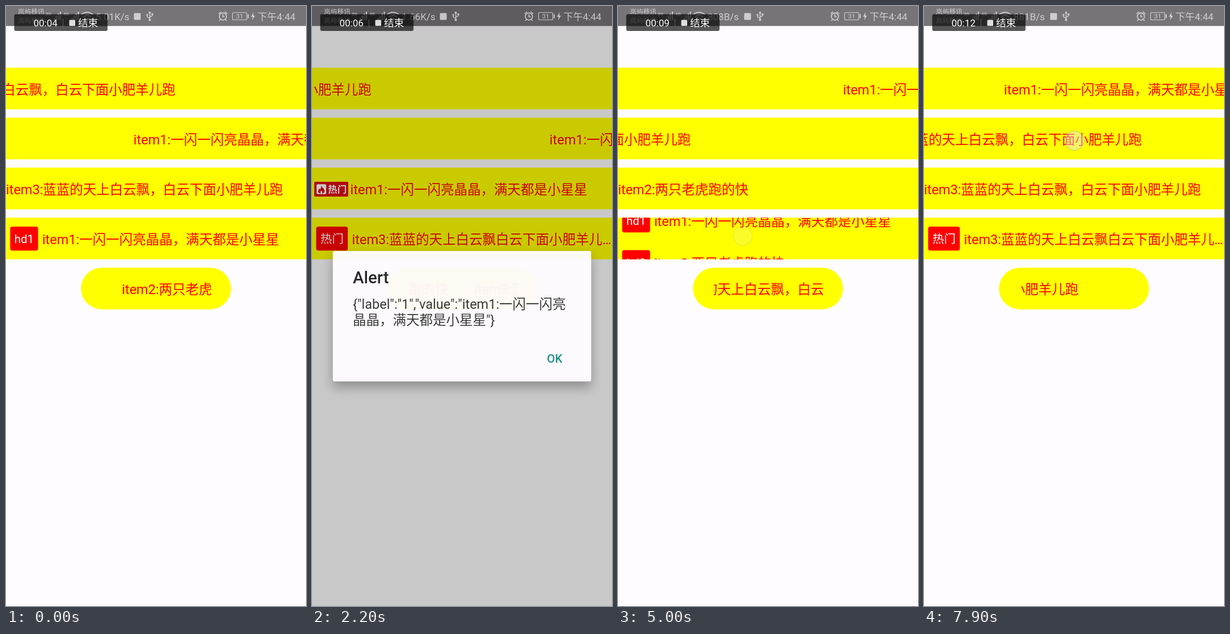
These frames come from a looping animation (529 px wide and 1058 px high, 8 s). An HTML page:

```html
<!DOCTYPE html>
<html lang="zh-CN">
<head>
<meta charset="utf-8">
<title>Marquee</title>
<style>
html, body { margin: 0; width: 100%; height: 100%; overflow: hidden; background: #fefcfe; }
svg { font-family: Roboto, "Noto Sans CJK SC", "Noto Sans CJK", sans-serif; }
#stage { display: block; width: 100%; height: 100%; }
text { white-space: pre; }
.row text { font-size: 16px; fill: #f00; }
.row .tag { font-size: 14px; fill: #fff; }
.row .hot { font-size: 11.2px; font-weight: 700; fill: #fff; }
#panel { filter: drop-shadow(0 7px 7px rgba(0, 0, 0, .3)); }
</style>
</head>
<body>
<svg id="stage" viewBox="0 0 360 720">
  <rect width="360" height="720" fill="#fefcfe"/>
  <rect width="360" height="24" fill="#777477"/>
  <g fill="#ff0">
    <rect y="74" width="360" height="50"/>
    <rect y="134" width="360" height="50"/>
    <rect y="194" width="360" height="50"/>
    <rect y="254" width="360" height="50"/>
    <rect x="90" y="314" width="180" height="50" rx="25"/>
  </g>
  <svg class="row" id="left" y="74" width="360" height="50"></svg>
  <svg class="row" id="right" y="134" width="360" height="50"></svg>
  <svg class="row" id="up" y="194" width="360" height="50"></svg>
  <svg class="row" id="down" y="254" width="360" height="50"></svg>
  <svg class="row" id="pill" x="115" y="314" width="131" height="50" viewBox="115 0 131 50"></svg>

  <rect id="dim" width="360" height="720"/>
  <g id="dialog">
    <rect id="panel" x="25" y="294" width="310" height="156.5" rx="2" fill="#fffdff"/>
    <text x="49" y="333" font-size="20" font-weight="500" fill="#222">Alert</text>
    <g font-size="16" fill="#333">
      <text x="49" y="363.6">{"label":"1","value":"item1:一闪一闪亮</text>
      <text x="49" y="382.8">晶晶，满天都是小星星"}</text>
    </g>
    <svg x="270" y="404.4" width="52" height="36">
      <circle id="ripple" cx="25.4" cy="18" fill="#000" fill-opacity=".12"/>
    </svg>
    <text x="282" y="428.2" font-size="14" font-weight="500" fill="#148f83">OK</text>
  </g>

  <!-- status bar, in device pixels -->
  <g transform="scale(.68053)">
    <g fill="#fff" opacity=".65" font-size="17">
      <g font-size="11.7">
        <text x="21" y="14">岚屿移讯</text>
        <text x="21" y="30">岚屿移讯</text>
      </g>
      <g font-size="8" font-weight="700">
        <text x="70" y="17">2G</text>
        <text x="101" y="17">4G</text>
      </g>
      <path id="bars" d="M84 21h2v4h-2zM87.700 17h2v8h-2zM91.400 13h2v12h-2zM95 10h2v15h-2z"/>
      <use href="#bars" x="31.500"/>
      <g fill="none" stroke="#fff" stroke-width="1.700">
        <path d="M132.500 15.500a15 15 0 0 1 21 0M136 19.500a10 10 0 0 1 14 0M140 23a5 5 0 0 1 6 0"/>
        <circle cx="382.500" cy="18.500" r="6.300"/>
        <path d="M382.500 14.500v4.500h3M375 14l4-4M390 14l-4-4M378 24l-2 2M387 24l2 2"/>
        <rect x="399.500" y="11.500" width="25" height="13" rx="2" stroke-width="1.200"/>
      </g>
      <text id="speed" x="158" y="24.500"></text>
      <g id="usb">
        <rect x="225.500" y="12.500" width="12" height="12" rx="1.500"/>
        <path d="M253.500 12v13M253.500 22l-4.500-3v-3M253.500 20l4.500-3v-3" fill="none" stroke="#fff" stroke-width="1.500"/>
        <path d="M251 13l2.500-4 2.500 4z"/>
        <circle cx="253.500" cy="24.500" r="2"/>
        <circle cx="249" cy="15.500" r="1.600"/>
        <rect x="256.500" y="13" width="3" height="3"/>
      </g>
      <text x="412" y="22" font-size="11.500" text-anchor="middle">31</text>
      <rect x="426" y="14.500" width="2" height="7"/>
      <path d="M436.500 11l-4.500 8h3l-1 6 5-8h-3z"/>
      <text x="443.500" y="24.500">下午4:44</text>
    </g>
    <rect x="14.500" y="14.500" width="164.500" height="29.500" rx="3" fill-opacity=".66"/>
    <circle id="dot" cx="37" cy="30" r="6" fill="#ff3322"/>
    <g fill="#fff" font-size="17">
      <text id="clock" x="48.500" y="36"></text>
      <rect x="100" y="23" width="1" height="14" opacity=".25"/>
      <rect x="111.500" y="24.500" width="10.500" height="10.500" rx="1.500" opacity=".85"/>
      <text x="127" y="36" font-size="17.600">结束</text>
    </g>
  </g>
  <circle id="touch" r="11.5" fill="#e6e6e6" fill-opacity=".45" stroke="#999" stroke-opacity=".4"/>
</svg>

<script>
const LOOP = 8000, SPEED = 0.06, ROW = 50;
const STAR = 'item1:一闪一闪亮晶晶，满天都是小星星';
const TIGER = 'item2:两只老虎跑的快';
const SHEEP = 'item3:蓝蓝的天上白云飘，白云下面小肥羊儿跑';
const SHEEP_CUT = 'item3:蓝蓝的天上白云飘白云下面小肥羊儿…';

const $ = id => document.getElementById(id);
const clamp = x => Math.max(0, Math.min(1, x));
const easeInOut = x => x < .5 ? 2 * x * x : 1 - 2 * (1 - x) ** 2;

function add(rowId, markup) {
  const group = document.createElementNS('http://www.w3.org/2000/svg', 'g');
  group.innerHTML = markup;
  $(rowId).append(group);
  return group;
}
const label = (text, x = 0) => `<text x="${x}" y="32">${text}</text>`;
const tagged = (tag, width, text) =>
  `<rect x="5" y="10.7" width="${width}" height="28.7" rx="2.500" fill="#f00"/>
   <text class="tag" x="10" y="30.500">${tag}</text>` + label(text, width + 10);
const hotBadge =
  `<rect x="2.700" y="17" width="40.800" height="17.700" rx="1" fill="#dc0a14"/>
   <rect x="5.500" y="19.800" width="11.500" height="12" rx="1.500" fill="#fff"/>
   <path d="M11 21c.5 2.500 4 4 4 7 0 2-1.500 3-3 3 1-1.500 0-2.500-.8-3.500-.8 1-1.500 2-.7 3.500-2 0-3.500-1.500-3-3.500.2-1 1-1.500 1.200-2.500.6.300.8.800.9 1.300 1-1.300 1.700-3 1.400-5.300z" fill="#dc0a14"/>
   <text class="hot" x="19.200" y="30">热门</text>`;

// Horizontal tickers: x position at time 0 and direction of travel.
const tickers = [
  ['left', SHEEP, -129, -1],
  ['left', STAR, 360 + 3500 * SPEED, -1],
  ['right', STAR, 153, 1],
  ['right', SHEEP, -245 - 5000 * SPEED, 1],
  ['pill', TIGER, 139, -1],
  ['pill', SHEEP, 327, -1]
].map(([row, text, x, dir]) => ({ group: add(row, label(text)), x, dir }));

// Vertical carousels: each holds an item, then slides to the next in 500 ms.
const carousels = [
  { row: 'up', start: 555, period: 2616, dir: 1,
    items: [label(SHEEP), hotBadge + label(STAR, 46), label(TIGER)] },
  { row: 'down', start: 767, period: 1983, dir: -1,
    items: [tagged('hd1', 33.5, STAR), tagged('热门', 38, SHEEP_CUT), tagged('hd2', 33.5, TIGER)] }
].map(c => ({ ...c, groups: c.items.map(item => add(c.row, item)) }));

const dialogs = [{ open: 2100, close: 3350 }, { open: 5100, close: 6290 }];
const touches = [
  [3220, 3550, 297, 425], [4820, 5060, 149.7, 275.6],
  [6160, 6440, 297, 425], [7800, 8150, 180.5, 161.5]
];
const speeds = [[0, '5.01K/s'], [1500, '1.66K/s'], [4400, '808B/s'], [7400, '881B/s']];

function drawCarousel({ start, period, dir, groups }, t) {
  const n = Math.floor((t - start) / period);
  const position = n + easeInOut(clamp((t - start - n * period) / 500));
  groups.forEach((group, k) => {
    const offset = k - position;
    const wrapped = offset - 3 * Math.round(offset / 3);
    group.setAttribute('transform', `translate(0 ${dir * ROW * wrapped})`);
  });
}

function drawDialog(t) {
  const { open, close } = dialogs[t < 4500 ? 0 : 1];
  const fadeIn = 1 - (1 - clamp((t - open) / 220)) ** 5;
  const fadeOut = 1 - clamp((t - close) / 150);
  const dimOut = 1 - clamp((t - close - 50) / 150);
  $('dialog').setAttribute('opacity', fadeIn * fadeOut);
  $('dim').setAttribute('opacity', .6 * clamp((t - open) / 290) * dimOut);
  $('ripple').setAttribute('r', 22.5 * clamp((t - close + 120) / 160));
}

function drawStatus(t) {
  const seconds = t + 250;
  $('clock').textContent = '00:' + String(4 + Math.floor(seconds / 1000)).padStart(2, '0');
  $('dot').setAttribute('opacity', seconds % 1000 >= 500 ? 1 : 0);
  const speed = speeds.filter(([from]) => t >= from).pop()[1];
  $('speed').textContent = speed;
  $('usb').setAttribute('transform', `translate(${speed.includes('K') ? 0 : -3} 0)`);
}

function drawTouch(t) {
  const active = touches.find(([from, to]) => t >= from && t < to);
  $('touch').setAttribute('opacity', active ? clamp((active[1] - t) / 150) : 0);
  if (active) $('touch').setAttribute('transform', `translate(${active[2]} ${active[3]})`);
}

function draw(now) {
  const t = now % LOOP;
  for (const { group, x, dir } of tickers)
    group.setAttribute('transform', `translate(${x + dir * SPEED * t} 0)`);
  carousels.forEach(c => drawCarousel(c, t));
  drawDialog(t);
  drawStatus(t);
  drawTouch(t);
}

let begin;
function frame(now) {
  begin ??= now;
  draw(now - begin);
  requestAnimationFrame(frame);
}
draw(0);
requestAnimationFrame(frame);
</script>
</body>
</html>
```
